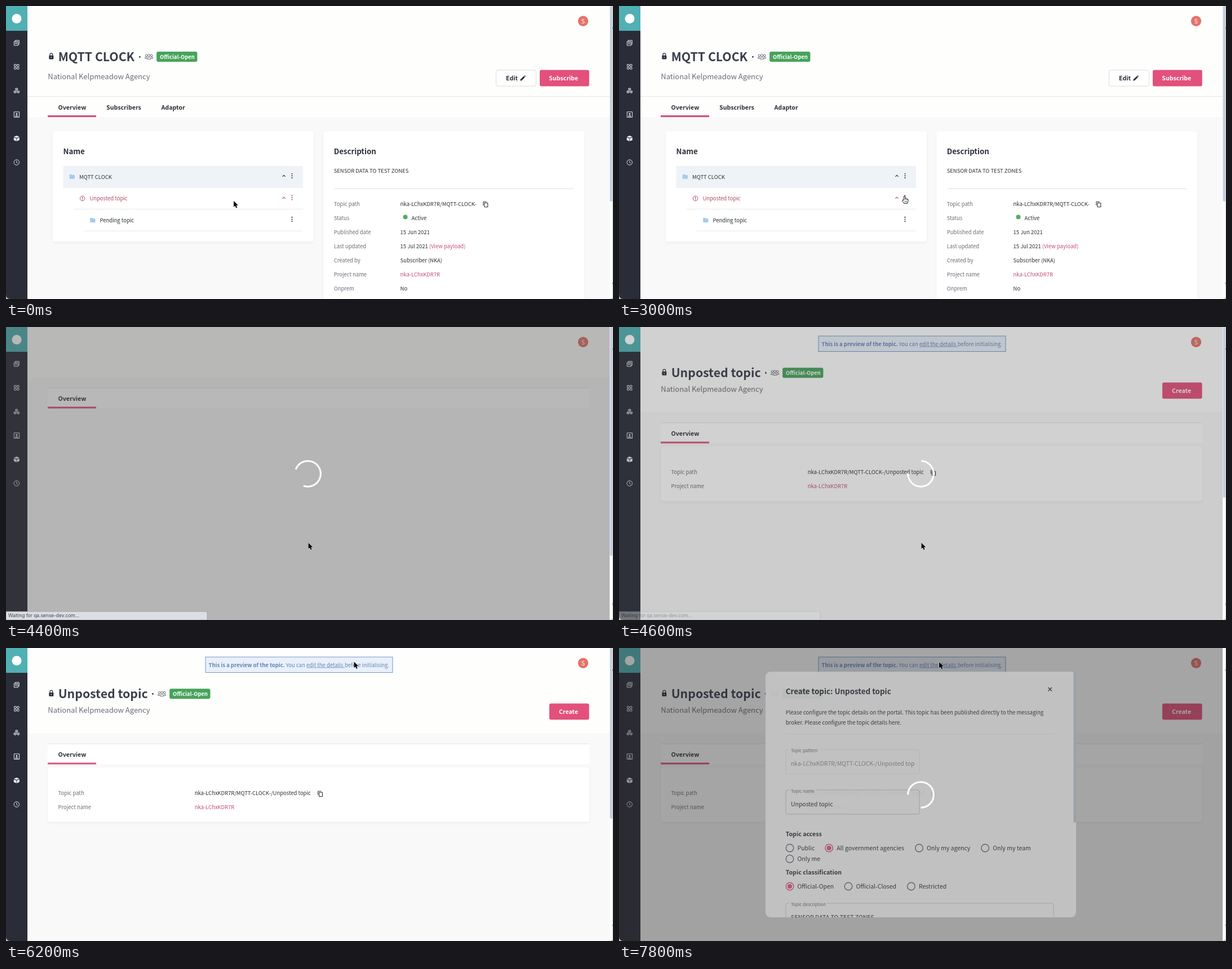
Animation, 1077 px wide and 520 px high, one loop 8 s. Source, as an HTML page:

```html
<!DOCTYPE html>
<html lang="en">
<head>
<meta charset="utf-8">
<title>Topic preview</title>
<style>
  html, body { margin: 0; width: 100%; height: 100%; overflow: hidden; background: #fefffe; }
  svg { display: block; width: 1077px; height: 520px; }
  text { font-family: "Noto Sans CJK SC", "Noto Sans CJK JP", "Noto Sans CJK", "Noto Sans", sans-serif; white-space: pre; }
  .ui { font-family: Inter, sans-serif; }
</style>
</head>
<body>
<svg id="stage" viewBox="0 0 1077 520" xmlns="http://www.w3.org/2000/svg"></svg>
<script>
const INK = '#2b2e38', GREY = '#696c76', PINK = '#c74b76', ROSE = '#e3507c', RED = '#b54864', BLUE = '#6283b8';
const SHEET = '#f6f6f6';
const BODY = 9.43, MEDIUM = 10.5, STRONG = 10.65, HEADING = 13.25, TITLE = 21.25;
const AGENCY = 'National Kelpmeadow Agency';
const PROJECT = 'nka-LChxKDR7R';
const PATH = PROJECT + '/MQTT-CLOCK-';

// Drawing helpers
const text = (x, y, str, fill = INK, size = BODY, weight = 400, extra = '') =>
  `<text x="${x}" y="${y}" fill="${fill}" font-size="${size}" font-weight="${weight}" ${extra}>${str}</text>`;
const bold = (x, y, str, size = STRONG, fill = INK) => text(x, y, str, fill, size, 700);
const rect = (x, y, w, h, fill, r = 0, extra = '') =>
  `<rect x="${x}" y="${y}" width="${w}" height="${h}" rx="${r}" fill="${fill}" ${extra}/>`;
const circle = (x, y, r, fill, extra = '') => `<circle cx="${x}" cy="${y}" r="${r}" fill="${fill}" ${extra}/>`;
const path = (d, fill, extra = '') => `<path d="${d}" fill="${fill}" ${extra}/>`;
const stroke = (d, color, width = 1) => path(d, 'none', `stroke="${color}" stroke-width="${width}"`);
const at = (x, y, content) => `<g transform="translate(${x} ${y})">${content}</g>`;
const group = (id, content) => `<g id="${id}">${content}</g>`;
const card = (x, y, w, h) => rect(x, y, w, h, '#fefffe', 4, 'filter="url(#soft)"');

// Icons, each centred on its own origin
const lock = (x, y) => at(x, y, rect(-4, -1.5, 8, 6.8, INK, 1) +
  stroke('M-2.4-1V-3A2.4 2.4 0 0 1 2.4-3V-1', INK, 1.2) + circle(0, 1.8, .9, '#fff'));
const people = (x, y) => at(x, y, [[-4.4, -1.6], [4.4, -1.6], [0, -2]].map(([px, py]) =>
  circle(px, py, 1.9, '#fefffe', `stroke="${GREY}"`)).join('') +
  stroke('M-3.3 4.6V3.4Q-3 1.2 0 1.2T3.3 3.4V4.6ZM-3.6 3.4H-7V2.3Q-6.7.8-4 .8M3.6 3.4H7V2.3Q6.7.8 4 .8', GREY));
const folder = (x, y) => at(x, y, path('M-4.6-4H-1L0-2.8H4.6V4H-4.6Z', '#a3cbee'));
const dots = (x, y, color = INK) => [-3.6, 0, 3.6].map(d => circle(x, y + d, 1.05, color)).join('');
const chevron = (x, y, color = INK) => at(x, y, stroke('M-2.6 1.4L0-1.2L2.6 1.4', color, 1.1));
const copy = (x, y) => at(x, y, stroke('M-4 2V-4.5H2', INK) + rect(-2, -2.5, 6, 7.3, 'none', .8, `stroke="${INK}" stroke-width="1.1"`));
const pencil = (x, y) => at(x, y, path('M-4.5 4.5V2.4L1.6-3.6L3.7-1.5L-2.4 4.5ZM2.2-4.1L3.1-5L5.1-2.9L4.2-2Z', INK));
const badge = (x, y) => rect(x, y, 72.3, 18, '#47a35b', 3) + bold(x + 6, y + 12.8, 'Official-Open', 9.45, '#fff');

const heading = (title, y, afterX, subY) =>
  lock(80.3, y - 8.3) + bold(92.7, y, title, TITLE, '#3a3e4b') + circle(afterX, y - 7.3, 1.4, INK) +
  people(afterX + 16.2, y - 8) + badge(afterX + 29.7, y - 16.6) + text(74.3, subY, AGENCY, GREY, 13);
const avatar = circle(1024, 26.7, 9.2, '#e4736a') + text(1024, 30.6, 'S', '#fff', 10.5, 400, 'text-anchor="middle"');
const tabStrip = y => rect(74, y, 961, 36.5, '#fefffe') + rect(74, y - .5, 961, 1, '#e2e3e5') +
  bold(92.5, y + 23, 'Overview') + rect(74, y + 33.5, 86, 3, '#dd4f7a');
const backdrop = headerHeight => rect(38, 0, 1034, 520, '#f9f9f9') + rect(38, 0, 1034, headerHeight, '#fefffd');

function sidebar() {
  const icons = [
    stroke('M-2.5-2.5V-4.5H4.5V2.5H2.5M-4.5-2.5H2.5V4.5H-4.5ZM-3-.5H1M-3 1.5H1', '#e8e9ec'),
    [[-4.3, -4.3], [.8, -4.3], [-4.3, .8], [.8, .8]].map(([x, y]) => rect(x, y, 3.4, 3.4, 'none', .4, 'stroke="#e8e9ec"')).join(''),
    [[0, -2.7], [-2.8, 2], [2.8, 2]].map(([x, y]) => at(x, y, stroke('M0-2L2-1V1.2L0 2.2L-2 1.2V-1ZM-2-1L0 0L2-1M0 0V2', '#e8e9ec', .9))).join(''),
    stroke('M-4.5-4.8H4.8V4.8H-4.5ZM-2.4 3Q0-.2 2.6 3Z', '#e8e9ec') + circle(.1, -1.2, 1.5, '#e8e9ec'),
    path('M0-5L5-3L0-1L-5-3ZM-5-1.9L-.4 0V5L-5 3ZM5-1.9L.4 0V5L5 3Z', '#e8e9ec'),
    circle(0, 0, 4.7, 'none', 'stroke="#e8e9ec"') + stroke('M0-2.8V.2L2 1.6', '#e8e9ec')
  ];
  return rect(0, 0, 38, 520, '#2a2d38') + rect(0, 0, 38, 44, '#50b0b3') + circle(19, 22.5, 8.5, '#fff') +
    icons.map((icon, i) => at(18.8, 65.5 + i * 42.4, icon)).join('');
}

function topicPage() {
  const details = [
    ['Topic path', PATH], ['Status', ''], ['Published date', '15 Jun 2021'],
    ['Last updated', `15 Jul 2021 <tspan fill="${PINK}">(View payload)</tspan>`],
    ['Created by', 'Subscriber (NKA)'], ['Project name', `<tspan fill="${PINK}">${PROJECT}</tspan>`], ['Onprem', 'No']
  ];
  return backdrop(197) + rect(38, 160, 1034, 1, '#e4e4e5') + heading('MQTT CLOCK', 97.6, 237.4, 129.6) +
    rect(869.5, 113.8, 71, 28.4, '#fefffe', 3, 'stroke="#dadbde"') + bold(887, 132, 'Edit') + pencil(917, 128) +
    rect(947, 113.5, 87.7, 29, ROSE, 3) + bold(963.3, 132, 'Subscribe', STRONG, '#fff') +
    bold(92.5, 184, 'Overview') + bold(178, 184, 'Subscribers') + bold(275.5, 184, 'Adaptor') +
    rect(74, 194, 86, 3.2, '#cf527b') +
    card(83, 222.5, 462.7, 195.5) + card(563.5, 222.5, 462.5, 310) +
    bold(101.5, 262.5, 'Name', HEADING) + rect(101.5, 284, 425.5, 38, '#eff3f7') +
    [[101.5, 321.5], [120, 360], [138, 398.7]].map(([x, y]) => rect(x, y, 527 - x, 1, '#e9ebed')).join('') +
    folder(117.3, 302.8) + text(130, 306.6, 'MQTT CLOCK') + chevron(493, 301.5) + dots(507.5, 301.3) +
    circle(135.6, 341.5, 4.2, 'none', `stroke="${RED}"`) + rect(135, 339, 1.2, 3, RED) + rect(135, 342.8, 1.2, 1.2, RED) +
    text(148.4, 345.4, 'Unposted topic', RED) + chevron(493, 340.5, RED) + dots(507.5, 340, RED) +
    folder(153.8, 380) + text(166.5, 384, 'Pending topic') + dots(507.5, 378.5) +
    bold(581.7, 262.5, 'Description', HEADING) + text(581.7, 295.5, 'SENSOR DATA TO TEST ZONES') + rect(582, 323.7, 425, 1, '#dfe0e2') +
    details.map(([label, value], i) => text(581.7, 354.5 + i * 25.1, label, GREY) + text(699.6, 354.5 + i * 25.1, value)).join('') +
    copy(850.8, 352) + circle(708.5, 374.5, 4, '#58ab61') + text(719.5, 380.4, 'Active');
}

function previewPage() {
  return backdrop(151) + rect(354, 16, 332, 27.5, '#e9f0f9', 0, 'stroke="#7398cc"') +
    bold(359.5, 33.6, 'This is a preview of the topic.', 9.5, BLUE) + text(496.8, 33.6, 'You can', BLUE) +
    text(533, 33.6, 'edit the details ', BLUE) + rect(533, 34.6, 68, .7, BLUE) + text(601, 33.6, 'before initialising.', BLUE) +
    heading('Unposted topic', 88.8, 260.4, 114.7) +
    rect(964, 98.4, 70.6, 28.8, ROSE, 3) + bold(981, 116.7, 'Create', STRONG, '#fff') +
    tabStrip(170) + card(74, 212, 961, 96.3) +
    text(92.5, 260.5, 'Topic path', GREY) + text(334.7, 260.5, PATH + '/Unposted topic') + copy(557.5, 258.7) +
    text(92.5, 285.5, 'Project name', GREY) + text(334.7, 285.5, PROJECT, PINK);
}

function modal() {
  const field = (y, width, height, label, labelWidth, border) =>
    rect(296, y, width, height, 'none', 3, `stroke="${border}"`) + rect(302, y - 2, labelWidth, 4, SHEET) +
    text(305, y + 4.9, label, GREY, 7.7);
  const radio = (x, y, label, on) =>
    circle(x, y, 6.8, 'none', `stroke="${on ? ROSE : '#666a74'}" stroke-width="1.4"`) +
    (on ? circle(x, y, 4, ROSE) : '') + text(x + 13.5, y + 4.1, label, INK, MEDIUM);
  const intro = (y, str) => text(295.7, y, str, INK, 9.57);
  return rect(260, 42, 551, 436, SHEET, 9) + rect(806.5, 43, 4.5, 267, '#bdc5d5', 2) +
    `<g clip-path="url(#sheet)">` +
    bold(295.7, 82, 'Create topic: Unposted topic', 13.4) + stroke('M761.5 70L768 76.5M768 70L761.5 76.5', INK, 1.3) +
    intro(118.2, 'Please configure the topic details on the portal. This topic has been published directly to the messaging') +
    intro(136.1, 'broker. Please configure the topic details here.') + rect(296, 152, 475, 1, '#e6e6e8') +
    field(180.3, 237, 43, 'Topic pattern', 54, '#e0e1e3') +
    `<g clip-path="url(#input)">${text(305, 209.2, PATH + '/Unposted topic', '#8b8d95', 10.42)}</g>` +
    field(252, 237, 43, 'Topic name', 47, '#c0c2c7') + text(305, 281.2, 'Unposted topic', INK, 10.45) +
    bold(295.7, 333.8, 'Topic access') + radio(303, 355, 'Public') + radio(372.7, 355, 'All government agencies', true) +
    radio(532.5, 355, 'Only my agency') + radio(649.7, 355, 'Only my team') + radio(303, 374.2, 'Only me') +
    bold(295.7, 402.2, 'Topic classification') + radio(303, 423, 'Official-Open', true) +
    radio(407, 423, 'Official-Closed') + radio(518.4, 423, 'Restricted') +
    field(453, 475, 60, 'Topic description', 67, '#cbcdd1') + text(305, 482.3, 'SENSOR DATA TO TEST ZONES', INK, MEDIUM) + '</g>';
}

const stage = document.getElementById('stage');
stage.innerHTML = `<defs>
  <filter id="soft" x="-5%" y="-10%" width="110%" height="125%"><feDropShadow dx="0" dy="2.5" stdDeviation="2.5" flood-color="#000" flood-opacity=".045"/></filter>
  <clipPath id="sheet"><rect x="260" y="42" width="551" height="436" rx="9"/></clipPath>
  <clipPath id="input"><rect x="300" y="185" width="225" height="35"/></clipPath></defs>` +
  group('topic', topicPage()) +
  group('loading', backdrop(90) + tabStrip(108)) +
  group('preview', previewPage()) +
  sidebar() + avatar +
  group('form', rect(0, 0, 1072, 520, '#000', 0, 'opacity=".2"') + `<g opacity=".92">${modal()}</g>`) +
  rect(0, 0, 1072, 520, '#404040', 0, 'id="dim"') +
  group('spinner', stroke('M22.8 0A22.8 22.8 0 1 1 0-22.8', '#fff', 3)) +
  group('status', path('M0 505H354Q357 505 357 508V520H0Z', '#dbdee3', 'stroke="#9c9fa5" stroke-width=".8"') +
    text(4, 515.4, 'Waiting for qa.sense-dev.com...', '#40434a', 8.4, 400, 'class="ui"')) +
  rect(1071, 0, 6, 520, '#fcfdfd') + rect(1071.5, 0, 4.5, 10, '#c6cedd', 2, 'id="thumb"') +
  rect(1076, 0, 1, 520, '#c8cbd0') + rect(1076, 38, 1, 2, '#555') + rect(1076, 491, 1, 2, '#555') +
  path('M0 512V520H8Q0 520 0 512M1077 512V520H1069Q1077 520 1077 512', '#c9cbce') +
  group('cursor',
    group('arrow', path('M0 0V10.8L2.5 8.5L4.2 12.4L6.1 11.6L4.4 7.8H7.8Z', '#000', 'stroke="#fff" stroke-width=".9" paint-order="stroke"')) +
    group('hand', path('M-1.2 8V1Q-1.2 0 0 0T1.2 1V4.6Q2.5 3.8 3.1 4.9Q4.3 4.3 4.9 5.4Q6.6 5.2 6.5 7V9.3L5.2 13.4H-.7L-3.8 8.7Q-4.3 7.1-2.8 7Z', '#fff', 'stroke="#000" stroke-width=".9"') +
      stroke('M1.2 4.6V7M3.1 4.9V7.2M4.9 5.4V7.4M.8 9V11.5M2.4 9V11.5M4 9V11.5', '#000', .6)));

const el = id => document.getElementById(id);
const show = (id, on) => el(id).setAttribute('visibility', on ? 'visible' : 'hidden');

const STEP = 200, LOOP = 8000;
const LOAD = 4400, PREVIEW = 4600, READY = 4800, SUBMIT = 7600, FORM = 7800;
const THUMB = { topic: 347, loading: 406, preview: 303 };
// Pointer stops: time, x, y
const POINTER = [[0, 404, 346], [1200, 404, 346], [2200, 506.5, 337], [3200, 506.5, 337], [3800, 536.5, 383],
  [4800, 536.5, 383], [6000, 629, 24], [6400, 606, 25], [6600, 606, 25], [7200, 568, 25], [LOOP, 568, 25]];

function pointerAt(t) {
  const i = POINTER.findIndex(stop => stop[0] > t);
  const [t0, x0, y0] = POINTER[i - 1], [t1, x1, y1] = POINTER[i];
  const k = (t - t0) / (t1 - t0), eased = k * k * (3 - 2 * k);
  return [x0 + (x1 - x0) * eased, y0 + (y1 - y0) * eased];
}

function draw(t) {
  const scene = t < LOAD ? 'topic' : t < PREVIEW ? 'loading' : 'preview';
  const form = t >= FORM;
  const loading = t >= LOAD && t < READY;
  const leaving = t >= PREVIEW;
  for (const id of ['topic', 'loading', 'preview']) show(id, id === scene);
  show('form', form);
  show('spinner', form || loading);
  el('dim').setAttribute('opacity', form ? .28 : !loading ? 0 : leaving ? .24 : .37);
  const turn = form ? 180 : 200 + (t - LOAD) / 1000 * 360;
  el('spinner').setAttribute('transform', `translate(535.5 260.5) rotate(${turn})`);
  show('status', t >= LOAD - STEP && t < READY);
  el('status').setAttribute('opacity', leaving ? .4 : 1);
  show('thumb', t < SUBMIT);
  el('thumb').setAttribute('height', THUMB[scene]);
  const hand = (t >= 2200 && t < LOAD) || (t >= 6800 && t < SUBMIT);
  show('hand', hand);
  show('arrow', !hand);
  el('cursor').setAttribute('transform', `translate(${pointerAt(t)})`);
}

const start = performance.now();
function tick() {
  const t = (performance.now() - start) % LOOP;
  draw(Math.floor(t / STEP) * STEP);
  requestAnimationFrame(tick);
}
tick();
</script>
</body>
</html>
```
